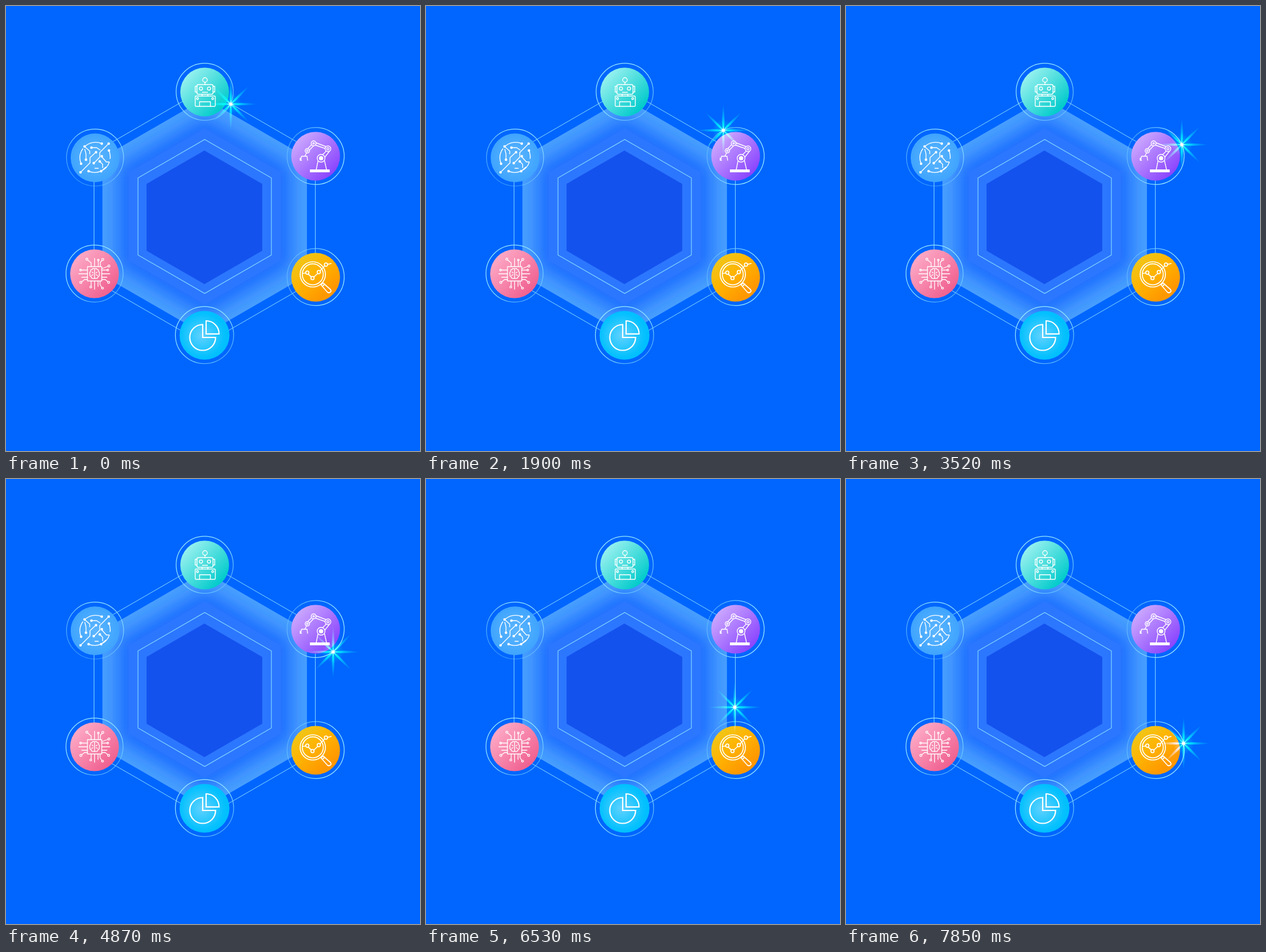
Animation of 722 by 776 pixels, one loop 8000 ms. Source, as an HTML page:

```html
<!DOCTYPE html>
<html lang="en">
<head>
<meta charset="utf-8">
<title>Hexagon spark</title>
<style>
html, body { margin: 0; width: 100%; height: 100%; overflow: hidden; background: #06f; }
svg { display: block; width: 722px; height: 776px; isolation: isolate; }
.icon { fill: none; stroke: #fff; stroke-width: 1.4; stroke-linecap: round; stroke-linejoin: round; }
.icon .solid { fill: #fff; stroke: none; }
.ring { fill: none; stroke-width: 1.2; }
.line { fill: none; stroke: #86dcff; }
#star { mix-blend-mode: screen; }
</style>
</head>
<body>
<svg viewBox="0 0 722 776">
  <defs>
    <linearGradient id="teal" x1=".12" y1=".15" x2=".85" y2=".85"><stop stop-color="#98f1ef"/><stop offset="1" stop-color="#00cacb"/></linearGradient>
    <linearGradient id="purple" x1=".12" y1=".15" x2=".85" y2=".85"><stop stop-color="#cba8ff"/><stop offset="1" stop-color="#8a45ff"/></linearGradient>
    <linearGradient id="orange" x1=".15" y1=".1" x2=".75" y2=".8"><stop stop-color="#efc719"/><stop offset=".5" stop-color="#ffb302"/><stop offset="1" stop-color="#ff9800"/></linearGradient>
    <linearGradient id="pink" x1=".12" y1=".15" x2=".85" y2=".85"><stop stop-color="#fda9c6"/><stop offset="1" stop-color="#f0608f"/></linearGradient>
    <radialGradient id="cyan" cx=".45"><stop stop-color="#62d2ff"/><stop offset=".85" stop-color="#08c1ff"/><stop offset="1" stop-color="#00bfff"/></radialGradient>
    <radialGradient id="sky"><stop stop-color="#5cb6ff"/><stop offset="1" stop-color="#3fa4ff"/></radialGradient>
    <linearGradient id="rim" x1=".1" y1="0" x2=".8" y2="1"><stop stop-color="#9cecff"/><stop offset=".55" stop-color="#8fe2ff"/><stop offset="1" stop-color="#6cc4ff" stop-opacity=".65"/></linearGradient>
    <linearGradient id="rimRight" x1="0" y1=".2" x2="1" y2=".6"><stop stop-color="#6cc4ff" stop-opacity=".55"/><stop offset=".6" stop-color="#8fe2ff"/><stop offset="1" stop-color="#9cecff"/></linearGradient>
    <linearGradient id="rimTop" x1=".7" y1="0" x2=".3" y2="1"><stop stop-color="#9cecff"/><stop offset="1" stop-color="#6cc4ff" stop-opacity=".5"/></linearGradient>
    <radialGradient id="ray" gradientUnits="userSpaceOnUse" cx="0" cy="0" r="48">
      <stop stop-color="#5ff"/><stop offset=".2" stop-color="#00e4ff" stop-opacity=".95"/>
      <stop offset=".5" stop-color="#00ccff" stop-opacity=".5"/><stop offset="1" stop-color="#00b0ff" stop-opacity="0"/>
    </radialGradient>
    <radialGradient id="halo"><stop stop-color="#5ff" stop-opacity=".75"/><stop offset=".4" stop-color="#00d8ff" stop-opacity=".35"/><stop offset="1" stop-color="#00b8ff" stop-opacity="0"/></radialGradient>
    <filter id="soft" x="-20%" y="-20%" width="140%" height="140%"><feGaussianBlur stdDeviation="15"/></filter>
    <filter id="fuzz" filterUnits="userSpaceOnUse" x="-55" y="-55" width="110" height="110"><feGaussianBlur stdDeviation=".7"/></filter>
    <clipPath id="plate"><path data-hex="206"/></clipPath>
  </defs>

  <rect width="722" height="776" fill="#06f"/>
  <g clip-path="url(#plate)">
    <path data-hex="206" fill="#4a9fff"/>
    <path data-hex="175" fill="#1a6eff" filter="url(#soft)"/>
  </g>
  <path data-hex="153.5" fill="#2c77ff"/>
  <path data-hex="116.5" transform="translate(-.5 1.5)" fill="#1452ee"/>
  <path class="line" data-hex="134.3" stroke-width="1.1"/>
  <path class="line" data-hex="222.8" stroke-width="1"/>
  <g id="nodes"></g>

  <!-- robot -->
  <g class="icon">
    <circle cx="347" cy="129" r="4"/>
    <path d="M347 133v4M342 154v3M352 154v3M342.500 150.500h9M333 140h-3v10h3M361 140h3v10h-3"/>
    <rect x="333" y="137" width="28" height="17" rx="2.500"/>
    <circle cx="340" cy="144" r="2.800"/><circle cx="354" cy="144" r="2.800"/>
    <rect x="330" y="157" width="35" height="18" rx="1.500"/>
    <circle cx="334" cy="161.500" r="1.700"/><circle cx="360.500" cy="161.500" r="1.700"/>
    <path d="M337.500 175v-8h19v8"/>
  </g>

  <!-- robot arm -->
  <g class="icon" stroke-width="1.600">
    <circle cx="536.500" cy="239.500" r="4.200"/><circle cx="536.500" cy="239.500" r="1.300"/>
    <circle cx="561.500" cy="249" r="5"/><circle cx="561.500" cy="249" r="2"/>
    <circle cx="525.500" cy="252.500" r="3.800"/><circle cx="525.500" cy="252.500" r="1.300"/>
    <circle cx="549.500" cy="265.500" r="6.800"/><circle class="solid" cx="549.500" cy="265.500" r="3.800"/>
    <path d="M540.500 238.500l17 6.500M539.500 242.500l17 6M532.800 242l-6.300 6.500M536 244l-6.500 7M558.500 253l-6 6M564 253.500l-7.500 9.500M544 270.500l-3 15M555.500 270l3.500 15.500"/>
    <path d="M524 256.500l-3 5.500M514 268.500l1.500-6.500h9.500l1 7M513 265v4h2.500"/>
    <rect class="solid" x="530" y="285" width="34.500" height="5"/>
  </g>

  <!-- magnifier -->
  <g class="icon" style="stroke-width:1.7">
    <circle cx="535" cy="468" r="22"/><circle cx="535" cy="468" r="18.300"/>
    <path d="M549.500 486.500l3.500-3.500 13 11.500q2 3-.5 4.500-2.500 2-5 0zM551.500 489l4.500-4M517 466.500l5.500-1M527 467.500l5.500 5M537 472.500l6.500-6M547.500 462l8.500-9M561 450.500l6-1.500"/>
    <circle cx="525.500" cy="465" r="2.800"/><circle cx="534.500" cy="474.500" r="2.800"/>
    <circle cx="545.500" cy="464" r="2.800"/><circle cx="558" cy="451" r="2.800"/>
  </g>

  <!-- pie chart -->
  <g class="icon" style="stroke-width:2.2;stroke-linejoin:miter">
    <path d="M343 555.500a22.500 22.500 0 1 0 22.500 22.500H343z"/>
    <path d="M349 549a22.500 22.500 0 0 1 22.500 22.800H349z"/>
  </g>

  <!-- chip -->
  <g class="icon" style="stroke-width:1.3">
    <rect x="142" y="454.500" width="25" height="25"/>
    <path d="M154.500 454v-14M148.500 454v-6l-6-5M161 454v-10M164.500 454v-7l3-3.500M154.500 480v14M148.500 480v8M160.500 480v9M164 480v6l3.500 5M142 460.500h-11M142 467h-15M142 473h-10M142 477h-5l-5 4M167 460.500h9M167 467h14M167 473h9M167 477h6l5 4M167 458l11-4"/>
    <path d="M154.500 458.500q-3-2-4.500 1-3 0-2.500 3.500-2.500 2-1 5-1 3.500 2 4 1 4 4 3 2 1 2-2zM154.500 458.500q3-2 4.500 1 3 0 2.500 3.500 2.500 2 1 5 1 3.500-2 4-1 4-4 3-2 1-2-2M150 464l2 1.500M149 470l3-1.500M159 464l-2 1.500M160 470l-3-1.500"/>
    <circle cx="141" cy="441.500" r="1.800"/><circle cx="161" cy="443" r="1.500"/><circle cx="168.800" cy="442" r="1.800"/>
    <circle cx="130" cy="460.500" r="1.500"/><circle cx="130.500" cy="482" r="1.800"/><circle cx="179.500" cy="453.500" r="1.800"/>
    <circle cx="177.500" cy="460.500" r="1.500"/><circle cx="179" cy="482" r="1.800"/><circle cx="147.800" cy="490" r="1.700"/><circle cx="168.300" cy="492" r="1.700"/>
  </g>

  <!-- circuit globe -->
  <g class="icon" style="stroke-width:1.4">
    <path d="M130 290l16.500-16.500v-9l8.500-8 2-1.500M179 240l-15.500 15.500v8l-10 10.500"/>
    <path d="M167 240a27 27 0 0 0-30 5.500M131 275a27 27 0 0 1 3-26M179.500 252a27 27 0 0 1 2 14M144 288a27 27 0 0 0 36-15M166 288l8-7M137 245l9 8v5M149 247h9l6 4M137.500 250l2 8v10M180 272h-5l-8-9M163.500 271l5 5v6M155 283h6"/>
    <g id="dots"></g>
  </g>

  <g id="star">
    <circle r="19" fill="url(#halo)"/>
    <g id="rays" fill="url(#ray)" filter="url(#fuzz)"></g>
    <path id="core" fill="#fff"/>
    <circle r="2.600" fill="#fff"/>
  </g>
</svg>
<script>
const $ = id => document.getElementById(id);
const RAD = Math.PI / 180;
const polar = (cx, cy, r, deg) => [cx + r * Math.cos(deg * RAD), cy + r * Math.sin(deg * RAD)];

for (const p of document.querySelectorAll('[data-hex]')) {
  const pts = [0, 1, 2, 3, 4, 5].map(i => polar(346.5, 367, +p.dataset.hex, i * 60 - 90));
  p.setAttribute('d', 'M' + pts.join('L') + 'Z');
}

const nodes = [
  [346.5, 150, 'teal', 'rim'], [540, 262, 'purple', 'rimRight'], [540, 473, 'orange', 'rimRight'],
  [346.2, 574.3, 'cyan', 'rim'], [154.4, 467, 'pink', 'rim'], [155.3, 264.7, 'sky', 'rimTop']
];
$('nodes').innerHTML = nodes.map(([x, y, fill, rim]) => {
  const wide = fill === 'cyan' ? 1 : 0;
  return `<ellipse cx="${x}" cy="${y}" rx="${42.5 + wide}" ry="42.5" fill="url(#${fill})"/>` +
    `<ellipse class="ring" cx="${x}" cy="${y - .4}" rx="${49.8 + wide}" ry="49.7" stroke="url(#${rim})"/>`;
}).join('');

$('dots').innerHTML = [
  [130, 290], [179, 240], [167, 240], [137, 245], [131, 275], [149, 247], [179.5, 252], [144, 288],
  [157, 255], [153, 274], [166, 288], [139.5, 268], [163.5, 271], [167, 262]
].map(([x, y]) => `<circle class="solid" cx="${x}" cy="${y}" r="2.200"/>`).join('');

$('rays').innerHTML = [0, 1, 2, 3, 4, 5, 6, 7].map(i => {
  const len = i % 2 ? 44 : 47;
  return `<path d="M0 0Q13 -4 ${len} 0Q13 4 0 0Z" transform="rotate(${i * 45})"/>`;
}).join('');
$('core').setAttribute('d', 'M' + Array.from({ length: 16 }, (_, i) =>
  polar(0, 0, i % 2 ? 1.8 : i % 4 ? 5.6 : 7, i * 22.5)).join('L') + 'Z');

// Playback alternates between short and long holds: [start, hold, first step]
const holds = [[0, 170, 0], [1360, 270, 8], [5680, 170, 24], [7040, 270, 32]];
const stepAt = t => {
  const [start, hold, first] = holds.filter(h => h[0] <= t).pop();
  return first + Math.floor((t - start) / hold);
};

// Along the edge, around the purple ring, down the side, around the orange ring
function starAt(n) {
  if (n < 8) return [392 + 13.65 * n, 171 + 7.75 * n];
  if (n < 24) return polar(540, 262, 50, -146 + 15.26 * (n - 8));
  if (n < 31) return [538.5, 320 + 15.6 * (n - 24)];
  if (n < 32) return polar(540, 473, 50, -86);
  return polar(540, 473, 50.2, -71 + 19.05 * (n - 32));
}

function draw() {
  const [x, y] = starAt(stepAt(performance.now() % 8000));
  $('star').setAttribute('transform', `translate(${x.toFixed(2)} ${y.toFixed(2)})`);
  requestAnimationFrame(draw);
}
draw();
</script>
</body>
</html>
```
